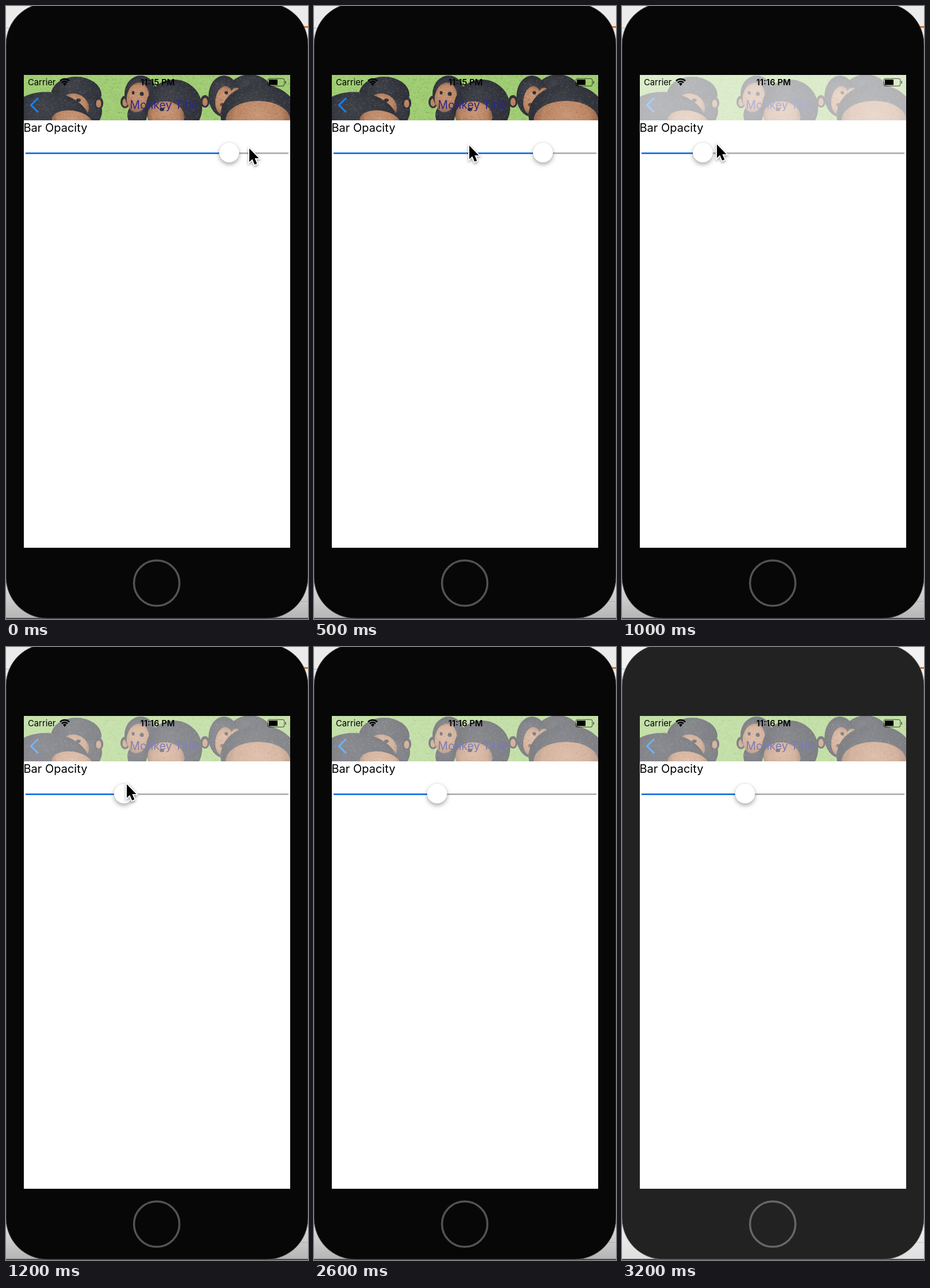
Animation, 525 px wide and 1067 px high, one loop 3.3 s. Source, as an HTML page with a canvas:

```html
<!DOCTYPE html>
<html lang="en">
<head>
<meta charset="utf-8">
<title>Bar Opacity</title>
<style>
html, body { margin: 0; width: 100%; height: 100%; overflow: hidden; background: #fff; }
canvas { display: block; }
</style>
</head>
<body>
<canvas id="stage" width="525" height="1067"></canvas>
<script>
const ctx = document.getElementById('stage').getContext('2d');
const LOOP = 3300, STEP = 100;
const SCREEN = { x: 31, y: 120, w: 463, h: 823 };
const BAR_H = 79, TRACK_Y = 256, TRACK_L = 34, TRACK_R = 491, KNOB_R = 17.5;
const FUR = '#24262e', TAN = '#b9805b';

// Pointer keys: step, x, y. The knob trails the pointer by one step.
const pointerKeys = [
  [-1, 388, 248], [0, 423, 248], [1, 444, 246], [2, 440, 244], [3, 423, 243],
  [4, 398, 242], [5, 270, 243], [6, 145, 243], [7, 117, 243], [8, 116, 243],
  [10, 165, 241], [11, 205, 239], [12, 210, 239], [13, 214, 241],
  [14, 236, 258], [17, 512, 438], [18, 540, 470]
];
const GRIP_END = 13, POINTER_END = 18, MINUTE_STEP = 10, DIM_STEP = 28;

function pointerAt(step) {
  const i = Math.max(1, pointerKeys.findIndex(k => k[0] >= step));
  const [a, x0, y0] = pointerKeys[i - 1], [b, x1, y1] = pointerKeys[i];
  const p = (step - a) / (b - a);
  return { x: x0 + (x1 - x0) * p, y: y0 + (y1 - y0) * p };
}

function seeded(seed) {
  return () => (seed = (seed * 16807) % 2147483647) / 2147483647;
}

function ellipse(c, x, y, rx, ry, fill, angle = 0) {
  c.beginPath();
  c.ellipse(x, y, rx, ry, angle, 0, Math.PI * 2);
  c.fillStyle = fill;
  c.fill();
}

function polygon(c, points) {
  c.beginPath();
  points.forEach(([x, y]) => c.lineTo(x, y));
  c.closePath();
}

function text(c, str, x, y, font, color, align = 'left') {
  c.font = font + ' Inter, sans-serif';
  c.fillStyle = color;
  c.textAlign = align;
  c.fillText(str, x, y);
}

function fur(c, x, y, rx, ry, angle = 0) {
  const g = c.createRadialGradient(x - rx * .2, y - ry * .5, 2, x, y, Math.max(rx, ry));
  g.addColorStop(0, '#363840');
  g.addColorStop(1, FUR);
  ellipse(c, x, y, rx, ry, g, angle);
}

function face(c, x, y, rx, ry, angle = 0) {
  const g = c.createRadialGradient(x, y - ry * .3, 1, x, y, Math.max(rx, ry));
  g.addColorStop(0, '#c69270');
  g.addColorStop(.7, TAN);
  g.addColorStop(1, '#8f6047');
  ellipse(c, x, y, rx, ry, g, angle);
}

function ear(c, x, y) {
  ellipse(c, x, y, 8, 11, FUR);
  ellipse(c, x, y + 1, 4.5, 7, TAN);
}

function drawToys(c) {
  // left pair
  ear(c, 161, 169);
  fur(c, 122, 155, 44, 32);
  fur(c, 147, 183, 20, 25);
  face(c, 120, 174, 25, 21, .5);
  ellipse(c, 126, 164, 4, 3, FUR);
  ear(c, 161, 169);
  fur(c, 76, 197, 70, 47, .12);
  face(c, 115, 202, 36, 20, .15);

  // middle pair
  ear(c, 207, 167);
  fur(c, 234, 153, 28, 32);
  fur(c, 228, 190, 17, 20);
  face(c, 229, 159, 19, 26, .2);
  ellipse(c, 236, 153, 3.5, 3.5, FUR);
  ellipse(c, 221, 151, 2.5, 3, FUR);
  fur(c, 292, 177, 49, 49);
  face(c, 278, 191, 32, 25, .1);
  ellipse(c, 271, 180, 4, 3, FUR);

  // right group
  ear(c, 346, 166);
  fur(c, 424, 151, 39, 32);
  fur(c, 379, 157, 27, 36);
  face(c, 379, 164, 15, 25, .15);
  ellipse(c, 383, 151, 3, 3, FUR);
  ellipse(c, 376, 172, 4, 3, '#54372c');
  face(c, 400, 157, 10, 15);
  fur(c, 440, 190, 67, 54);
  face(c, 438, 198, 56, 33);
}

function makeBar() {
  const bar = document.createElement('canvas');
  bar.width = SCREEN.w;
  bar.height = BAR_H;
  const c = bar.getContext('2d');
  c.translate(-SCREEN.x, -SCREEN.y);
  c.fillStyle = '#9ccb6c';
  c.fillRect(SCREEN.x, SCREEN.y, SCREEN.w, BAR_H);
  drawToys(c);

  // plush nap
  const rnd = seeded(71);
  for (let i = 0; i < 5000; i++) {
    c.fillStyle = rnd() < .5 ? 'rgba(255,255,255,.07)' : 'rgba(0,0,0,.07)';
    c.fillRect(SCREEN.x + rnd() * SCREEN.w, SCREEN.y + rnd() * BAR_H, 1 + rnd() * 2, 1 + rnd());
  }

  c.beginPath();
  c.moveTo(56, 160);
  c.lineTo(43.5, 172.5);
  c.lineTo(56, 185);
  c.strokeStyle = '#087cff';
  c.lineWidth = 3;
  c.stroke();
  text(c, 'Monkey Title', 274.5, 179, '19.5px', '#211d84', 'center');
  return bar;
}

const bar = makeBar();

function drawPhone(dimmed) {
  const g = ctx.createLinearGradient(0, 990, 0, 1067);
  g.addColorStop(0, dimmed ? '#f5f5f5' : '#e8e8e8');
  g.addColorStop(1, dimmed ? '#dedede' : '#b4b4b4');
  ctx.fillStyle = dimmed ? '#f2f2f2' : '#ebebeb';
  ctx.fillRect(0, 0, 525, 1067);
  ctx.fillStyle = g;
  ctx.fillRect(0, 990, 525, 77);
  ctx.fillStyle = '#b5b5b5';
  ctx.fillRect(0, 38, 12, 1);
  ctx.fillStyle = '#d8701f';
  ctx.fillRect(512, 35, 13, 3);
  ctx.fillStyle = '#777';
  for (let x = 513; x < 525; x += 3) ctx.fillRect(x, 1036, 1, 1);
  ctx.fillStyle = '#4b474c';
  ctx.fillRect(0, 1065, 525, 2);

  ctx.beginPath();
  ctx.roundRect(0, -5, 525, 1071, 72);
  ctx.fillStyle = dimmed ? '#222' : '#070707';
  ctx.fill();
  ctx.strokeStyle = dimmed ? '#777' : '#555';
  ctx.lineWidth = 1;
  ctx.stroke();

  ctx.beginPath();
  ctx.arc(262, 1004.5, 39.5, 0, Math.PI * 2);
  ctx.strokeStyle = dimmed ? '#676767' : '#535353';
  ctx.lineWidth = 3.5;
  ctx.stroke();
  ctx.fillStyle = '#fff';
  ctx.fillRect(SCREEN.x, SCREEN.y, SCREEN.w, SCREEN.h);
}

function drawStatus(time) {
  text(ctx, 'Carrier', 38, 138, '14.8px', '#000');
  text(ctx, time, 263.5, 138, '600 14.8px', '#000', 'center');

  ctx.strokeStyle = '#000';
  ctx.lineWidth = 2.5;
  for (const r of [11, 6.8]) {
    ctx.beginPath();
    ctx.arc(102, 138, r, -Math.PI * .76, -Math.PI * .24);
    ctx.stroke();
  }
  ctx.beginPath();
  ctx.moveTo(102, 139);
  ctx.arc(102, 138, 4, -Math.PI * .76, -Math.PI * .24);
  ctx.fillStyle = '#000';
  ctx.fill();

  ctx.beginPath();
  ctx.roundRect(455.2, 126.3, 28.6, 13, 3);
  ctx.strokeStyle = 'rgba(0,0,0,.55)';
  ctx.lineWidth = 1.2;
  ctx.stroke();
  ctx.fillRect(457, 128, 15, 9.5);
  ctx.fillStyle = 'rgba(0,0,0,.6)';
  ctx.fillRect(485.5, 130.5, 1.5, 4.5);
}

function drawSlider(x) {
  ctx.fillStyle = '#a9a9a9';
  ctx.fillRect(TRACK_L, TRACK_Y - 1, TRACK_R - TRACK_L, 2.5);
  ctx.fillStyle = '#066be8';
  ctx.fillRect(TRACK_L, TRACK_Y - 1, x - TRACK_L, 2.5);
  ctx.save();
  ctx.shadowColor = 'rgba(0,0,0,.32)';
  ctx.shadowBlur = 7;
  ctx.shadowOffsetY = 3.5;
  ellipse(ctx, x, 255, KNOB_R, KNOB_R, '#fff');
  ctx.restore();
  ctx.strokeStyle = 'rgba(0,0,0,.12)';
  ctx.lineWidth = .6;
  ctx.stroke();
}

function drawPointer({ x, y }) {
  ctx.save();
  ctx.translate(x, y);
  polygon(ctx, [[0, 0], [0, 23.5], [5.2, 18.5], [9.2, 28], [13.3, 26.2], [9.3, 17], [16.5, 17]]);
  ctx.shadowColor = 'rgba(0,0,0,.4)';
  ctx.shadowBlur = 4;
  ctx.shadowOffsetY = 2;
  ctx.strokeStyle = '#fff';
  ctx.lineWidth = 3.6;
  ctx.stroke();
  ctx.shadowColor = 'transparent';
  ctx.fillStyle = '#000';
  ctx.fill();
  ctx.restore();
}

function render(now) {
  const step = Math.floor((now % LOOP) / STEP);
  const knobX = pointerAt(Math.min(step - 1, GRIP_END)).x;
  const value = (knobX - TRACK_L - KNOB_R) / (TRACK_R - TRACK_L - 2 * KNOB_R);

  drawPhone(step >= DIM_STEP);
  // The translucent bar has a second layer behind it, so opacity rises quickly.
  ctx.globalAlpha = 1 - (1 - value) ** 1.8;
  ctx.drawImage(bar, SCREEN.x, SCREEN.y);
  ctx.globalAlpha = 1;
  drawStatus(step < MINUTE_STEP ? '11:15 PM' : '11:16 PM');
  text(ctx, 'Bar Opacity', 30.5, 219, '20px', '#000');
  drawSlider(knobX);
  if (step < POINTER_END) drawPointer(pointerAt(step));
  requestAnimationFrame(render);
}
render(0);
</script>
</body>
</html>
```
